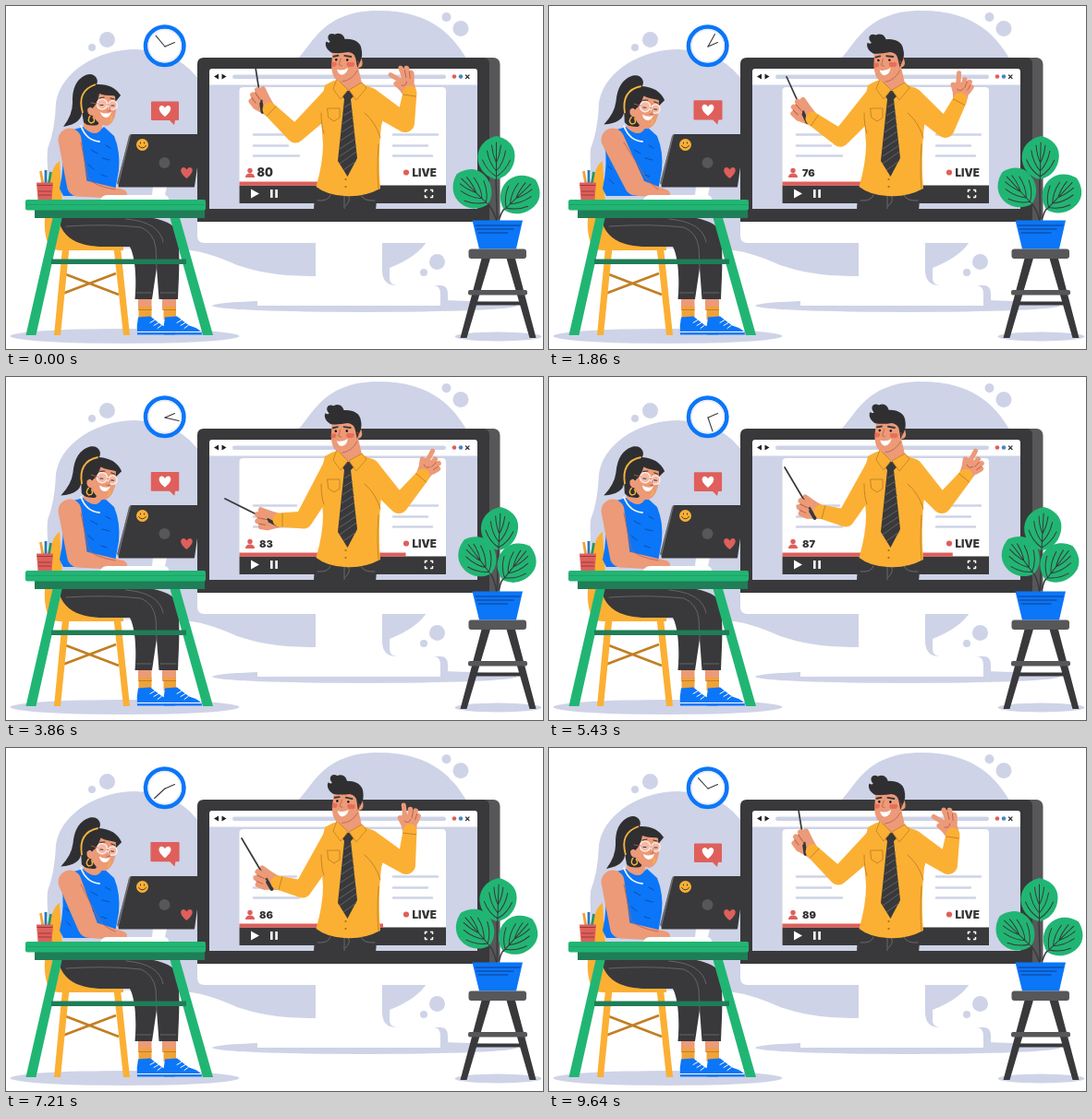
An HTML page that plays this animation: 581 by 372 pixels, repeating every 9.71 s.

```html
<!DOCTYPE html>
<html lang="en">
<head>
<meta charset="utf-8">
<title>Online lesson</title>
<style>
html, body { margin: 0; width: 100%; height: 100%; overflow: hidden; background: #fff; }
svg { display: block; width: 100vw; height: 100vh; }
text { font-family: Inter, sans-serif; font-weight: 900; fill: #333335; }
.pale { fill: #ced3e7; }
.dark { fill: #39393b; }
.grey { fill: #575759; }
.yellow { fill: #fbb034; }
.green { fill: #21b573; }
.deep { fill: #1f7d57; }
.blue { fill: #0b76f8; }
.red { fill: #df5f5b; }
.skin { fill: #ec9a78; }
.white { fill: #fff; }
.line { fill: none; stroke: #39393b; stroke-linecap: round; stroke-linejoin: round; }
.seam { fill: none; stroke: #c17f22; stroke-width: .9; stroke-linecap: round; }
.fold { fill: none; stroke: #b9604b; stroke-width: .8; stroke-linecap: round; }
.finger { fill: none; stroke: #ec9a78; stroke-width: 5; stroke-linecap: round; stroke-linejoin: round; }
</style>
</head>
<body>
<svg viewBox="0 0 581 372">
<defs>
  <path id="heart" d="M0 6C-9-1-6.500-6-3.300-6Q-1-6 0-3.500Q1-6 3.300-6C6.500-6 9-1 0 6Z"/>
  <g id="leaf">
    <path class="green" d="M0 0C-11-2-21-12-20-26C-19-38-9-45 0-47C10-45 20-38 20-26C20-12 11-2 0 0Z"/>
    <path class="line" stroke-width="1" d="M0 0V-40M0-3Q-10-9-15-21M0-3Q10-9 15-21M0-9Q-8-18-10-31M0-9Q8-18 10-31M0-18Q-4-26-5-37M0-18Q4-26 5-37"/>
  </g>
  <g id="shoe">
    <path class="blue" d="M1 0L14-1L27 9Q41 13 41 19H0Q-1 9 1 0Z"/>
    <path class="white" d="M0 15.500H40V16.500H0Z"/>
    <path class="line" style="stroke:#fff" stroke-width="1" d="M14 6l5-3M18 9l5-3M22 12l4-3"/>
  </g>
  <clipPath id="screen"><path d="M200 0H581V220H200Z"/></clipPath>
</defs>

<!-- backdrop -->
<g class="pale">
  <path d="M54 105C59 72 98 47 140 47Q190 49 212 85L462 240Q456 268 415 284Q375 296 335 293C295 293 275 289 250 281Q215 265 190 264L100 262Q40 235 45 155Q53 135 54 105Z"/>
  <path d="M312 60C330 48 338 5 403 5C462 5 485 34 500 60Z"/>
  <circle cx="109.500" cy="36.500" r="8.500"/><circle cx="93" cy="45" r="4"/>
  <circle cx="476.500" cy="12" r="5"/><circle cx="492" cy="24.500" r="8.500"/>
  <circle cx="466.500" cy="277.500" r="8.500"/><circle cx="452" cy="289" r="4"/>
  <ellipse cx="388" cy="325" rx="165" ry="7"/>
  <ellipse cx="128.500" cy="358" rx="124" ry="8"/>
  <ellipse cx="532.500" cy="358.500" rx="47" ry="5"/>
</g>

<!-- clock -->
<circle class="white" cx="171.700" cy="43.200" r="20.700" stroke="#0b76f8" stroke-width="4.600"/>
<circle cx="171.700" cy="43.200" r="17.500" fill="none" stroke="#e9ecf5" stroke-width="1.500"/>
<path class="line" stroke-width="1.100" d="M172 44L182.500 39.500"/>
<path id="minute" class="line" stroke-width="1.100" d="M172 44V28.500"/>

<!-- monitor -->
<path class="pale" d="M405 250H415V296Q416 303 423 303H470Q478 303 478 312V325H440V310H405Z"/>
<path class="white" d="M207 230H535V249Q535 257 527 257H407V288Q408 303 422 303H462Q470 303 470 312V325H272V319Q334 319 335 300V257H215Q207 257 207 249Z"/>
<path class="white" d="M272 303H340V325H272Z"/>
<rect class="grey" x="490" y="56" width="44.500" height="178" rx="7"/>
<path class="dark" d="M214 56H516Q523 56 523 63V234H207V63Q207 56 214 56Z"/>
<path class="pale" d="M220 80H510V220H220Z"/>
<path class="white" d="M220 85.500V71Q220 68 223 68H507Q510 68 510 71V85.500Z"/>
<path fill="#222" d="M230 73.500V79.500L225 76.500ZM233.500 73.500V79.500L238.500 76.500Z"/>
<rect class="pale" x="245" y="74.500" width="231" height="4.500" rx="2.200"/>
<circle class="red" cx="485" cy="76.500" r="2.300"/><circle cx="492" cy="76.500" r="2.300" fill="#4a86c8"/>
<path class="line" stroke-width="1.300" d="M497.500 75l3.500 3.500m0-3.500l-3.500 3.500"/>
<path class="white" d="M252.500 214V92Q252.500 88 257 88H472Q476 88 476 92V214Z"/>
<path fill="none" stroke="#ced3e7" stroke-width="2.400" stroke-linecap="round" d="M268 139.500H314M268 151.500H305M268 162.500H317M419 139.500H467M419 151.500H456M419 162.500H461"/>
<path class="dark" d="M252.500 194.500H476V214H252.500Z"/>
<rect id="progress" class="red" x="252.500" y="190.500" height="4.200"/>
<path class="white" d="M265 198.500L274 203.500L265 208.500ZM286 199h2.600v9h-2.600ZM291.300 199h2.600v9h-2.600Z"/>
<path class="line" style="stroke:#fff;stroke-linecap:butt" stroke-width="1.500" d="M456 199.500H453.500V202M459 199.500H461.500V202M456 207.500H453.500V205M459 207.500H461.500V205"/>
<circle class="red" cx="264" cy="178.500" r="2.700"/><path class="red" d="M259 186Q259 181.500 264 181.500Q269 181.500 269 186Z"/>
<text id="viewers" y="185"></text>
<circle class="red" cx="433" cy="180.500" r="3.100"/>
<text x="439.500" y="184.500" font-size="11.600">LIVE</text>

<!-- teacher -->
<g clip-path="url(#screen)">
  <path class="dark" d="M337 200H402Q401 210 400 222H333Q333 210 337 200Z"/>
  <path class="line" style="stroke:#77777b" stroke-width=".8" d="M337 211Q349 212 351 205M366 205V220M370 205Q374 211 367 217M384 205Q387 212 399 211"/>
  <g id="rightHand">
    <path class="skin" d="M-6 4C-8-4-9-11-6-17L7-17Q10-8 5 4Z"/>
    <g id="fingers">
      <path class="finger" d="M2-13L3-20M5-11L8-18M7-8L10-13"/>
      <path class="fold" d="M3.500-12L5.500-18M6.500-10L9-15"/>
    </g>
    <path class="finger" d="M-5-6L-8-14"/>
    <g id="index"><path class="finger" style="stroke-width:4.600" d="M0 0L0-11"/></g>
    <path class="fold" d="M-4-10Q0-7 2-11"/>
  </g>
  <g id="leftHand">
    <path class="skin" d="M-14-5L-4-8Q8-10 9 0Q8 9-2 9L-14 6Z"/>
    <path class="finger" d="M-2-6L6-9"/>
  </g>
  <path id="stick" class="line" stroke-width="1.700"/>
  <path id="handle" class="line" stroke-width="3.800"/>
  <g id="grip">
    <path class="finger" d="M2-3L9-5M2 2L9 1M0 7L6 6"/>
    <path class="fold" d="M2-.500L9-2M2 4.500L8 3.500"/>
  </g>
  <path id="sleeves" class="yellow"/>
  <path class="yellow" d="M345 86Q356 79 361 80L386 85Q402 89 408 109Q410 118 406 130Q402 165 405 198Q386 208 366 206Q347 205 335.500 196Q343 170 343 150L340 108Z"/>
  <path id="cuffs" class="seam"/>
  <path class="seam" d="M388 116Q400 126 405 143M341 116Q341 130 344 138M403 150Q401 180 403 198M348 111H361V121L355 125L349 121Z"/>
  <path class="skin" d="M360 70L380 62L385 84L371 92L360 82Z"/>
  <path class="dark" d="M366 92L375 92L376 98L373 101L380 165L369.500 185L359 168L366 101L364 98Z"/>
  <path fill="none" stroke="#68686c" stroke-width=".9" d="M366 110l8-5M365 119l10-6M364 128l12-8M363 137l14-9M362 146l15-10M361 155l17-11M361 163l18-12M361 171l18-13M365 178l14-10"/>
  <path class="yellow" stroke="#c17f22" stroke-width=".8" d="M358 79L370 91L362 101L354 90ZM385 83L371 91L379 102L390 89Z"/>
  <circle cx="367.500" cy="188" r="1.100" fill="#a96b18"/><circle cx="367.500" cy="196" r="1.100" fill="#a96b18"/>
  <g id="teacherHead">
    <path class="skin" d="M353 48L352 64C352 75 356 82 363 82C371 82 378 76 381 67Q387 66 385 59L381 45Z"/>
    <path fill="#e5604f" opacity=".75" d="M351.800 61h5q2 3-1 5h-4ZM369 61h7q2 3-1 5h-5q-3-2-1-5Z"/>
    <path fill="#2f2f31" d="M352 51C346 48 344 42 346 39Q349 41 350 39C345 34 349 28 355 31C361 28 365 32 366 36C375 35 383 39 384 46Q386 54 383 60L380 67L378 57Q377 51 370 50Q360 52 352 51Z"/>
    <path class="line" stroke-width="1.900" d="M354 55l5-1M366 54l7 1"/>
    <circle cx="357" cy="58.500" r="1.200"/><circle cx="369" cy="58.500" r="1.200"/>
    <path class="fold" d="M362 57L360 64L363 65M380 60q3 1 1 4M364 82Q374 81 380 70"/>
    <path class="white" d="M358 69Q364 71 370 67Q369 74 363 75Q359 74 358 69Z"/>
  </g>
</g>

<!-- chair -->
<path class="yellow" d="M58 168C46 176 49 196 44 214Q39 240 45 257Q48 266 60 265H127V250L62 232Z"/>
<path fill="none" stroke="#c17f22" stroke-width="2.800" d="M62 290L122 313M61 312L119 290"/>
<path class="yellow" d="M61 262h7.500L59 357H52ZM116.500 262h7.500L134 357H127Z"/>

<!-- legs -->
<path class="dark" d="M56 226C58 250 76 262 110 261L134 261C141 275 141 300 139.500 318H158L163 284L165.500 318H186C187 290 190 252 182 240Q172 229 130 226Z"/>
<path class="line" style="stroke:#707074" stroke-width=".8" d="M65 239Q110 236 146 240Q160 246 162 262L163 285M141 311H157M167 311H184M130 231Q166 234 170 256"/>
<path class="skin" d="M143 318h14.500v12h-14.500ZM169 318h15v12h-15Z"/>
<path fill="#f0a23a" d="M143.500 326h14v14h-14ZM170.500 326h13.500v14h-13.500Z"/>
<path fill="none" stroke="#c17f22" d="M143.500 329.500h14M170.500 329.500h13.500"/>
<use href="#shoe" x="171" y="337.500"/><use href="#shoe" x="142" y="337.500"/>

<!-- student -->
<path class="blue" d="M73 134L84 131Q96 141 106 131L117 141Q124 158 122 178L117 206H62L58 198Q64 170 60 150Z"/>
<path class="line" style="stroke:#0a4fae" stroke-width="1" d="M92 156l7 4M104 165l8 2M89 172l6 5M108 151l5 3M103 183l6 2M65 188l5 5M64 174l4 3M98 193l5 3"/>
<path class="skin" d="M84 116L104 122V132Q98 144 84 132Z"/>
<path class="line" style="stroke:#f3f3f3" stroke-width="1.800" d="M81 130Q87 146 101 147"/>
<path id="arm" class="skin"/>
<path id="armFold" class="fold"/>
<g id="studentHead">
  <path fill="#2f2f31" d="M86 75C96 71 101 80 98 85Q116 84 124 97L112 112L99 129Q88 131 84 126L82 114Q83 127 62 131Q72 118 72 105Q71 82 86 75Z"/>
  <path class="skin" d="M97 96Q108 91 118 98L119 114Q117 128 109 130Q99 129 94 119Q88 119 88 112Q91 108 94 111Z"/>
  <path fill="#2f2f31" d="M90 91Q108 83 124 97Q108 98 101 95Q99 107 93 111Q87 104 90 91Z"/>
  <path fill="none" stroke="#f4b441" stroke-width="1.800" d="M83 116Q76 92 97 85"/>
  <circle cx="104" cy="106.500" r="5.600" fill="#f5b8a4" stroke="#fff0e9" stroke-width="1.300"/>
  <circle cx="115.500" cy="107.500" r="4.800" fill="#f5b8a4" stroke="#fff0e9" stroke-width="1.300"/>
  <path class="fold" d="M109.500 107h1.500M92 105l7 1M112 109l1 5h-3"/>
  <path class="line" stroke-width="1.100" d="M101 100l5-1M113 100l4 1M102 107.500h3M114 108h3"/>
  <path class="white" d="M102 115Q108 118 114 115Q112 121 108 121Q103 120 102 115Z"/>
  <path fill="none" stroke="#f4b441" stroke-width="1.500" d="M91 119q-4 6 1 8q6-1 2-7M113 119q3 4-1 6"/>
</g>

<!-- desk -->
<path class="green" d="M51 228h10L32.500 357H21.500ZM177 228h10.500L224 357H213Z"/>
<path class="deep" d="M49 274.500H195V280H49ZM31 219H215V230H31Z"/>
<rect class="green" x="21" y="210" width="195" height="11.500" rx="2"/>
<path class="deep" d="M22 215H215V216H22Z" opacity=".35"/>
<path class="white" d="M102 210Q104 205 110 205H158L159 196H174L172 205Q176 206 176 210Z"/>
<path fill="#77777b" d="M134 139L120 192L123 196L140 141Z"/>
<path class="dark" stroke="#39393b" stroke-width="2" stroke-linejoin="round" d="M136 140H211L203 195.500H122.500Z"/>
<path class="line" style="stroke:#606064" stroke-width=".9" d="M133.500 141L121 192"/>
<circle class="grey" cx="171.500" cy="170" r="6"/>
<circle class="yellow" cx="147.500" cy="150.500" r="6.500"/>
<path class="line" stroke-width="1" d="M145.500 148v1M149.500 148v1M143.500 151.500q4 5 8 0"/>
<use class="red" href="#heart" x="195.500" y="181"/>
<path fill="none" stroke-width="2.800" stroke="#f0a23a" d="M40 194L37.500 179"/>
<path fill="none" stroke-width="2.800" stroke="#2878b8" d="M43 194V178"/>
<path fill="none" stroke-width="2.800" stroke="#2a946b" d="M46 194L48.500 180"/>
<path class="red" d="M33 191.500H51L49.500 210H34.500Z"/>
<path fill="none" stroke="#963c3b" stroke-width="1" d="M33.500 194.500H50.500M35 201H49M35 205H49"/>

<g id="bubble">
  <path class="red" d="M158 103.500H186Q187 103.500 187 104.500V123Q187 124 186 124H183L182 129L177 124H158Q157 124 157 123V104.500Q157 103.500 158 103.500Z"/>
  <use class="white" href="#heart" x="172" y="114"/>
</g>

<!-- plant -->
<g id="stemTop"><path class="line" stroke-width="1.500" d="M530 186L531.500 234"/><use href="#leaf" x="530.500" y="188"/></g>
<g id="stemLeft"><path class="line" stroke-width="1.500" d="M521 214Q528 222 531 234"/><use href="#leaf" transform="translate(521.500 215) rotate(-46)"/></g>
<g id="stemRight"><path class="line" stroke-width="1.500" d="M539 220Q535 225 533 234"/><use href="#leaf" transform="translate(539 221) rotate(46)"/></g>
<path class="dark" d="M515 272h9.500L498.500 360H491.500ZM541 272h9.500L573.500 360H566.500ZM502 320.500H563V324.500H502Z"/>
<rect class="grey" x="500" y="308" width="64" height="5.500" rx="2"/>
<path class="blue" d="M504.500 232.500H559L552 263.500H512Z"/>
<path class="line" style="stroke:#123d85" stroke-width="1" d="M508 238H556M509 242H549M511 246H543"/>
<rect class="grey" x="500.500" y="263.500" width="62.500" height="10.500" rx="3"/>
</svg>

<script>
const LOOP = 9710;
const TIMES = [0, 1070, 2570, 3860, 5430, 7210, LOOP];
const VIEWERS = [80, 76, 83, 87, 86, 89];

const REST = [313, 139, 285, 112, 270, 67];
const ASIDE = [321, 153, 294, 146, 255, 98];
// elbow, wrist, stick tip
const POINTING = [REST, REST, [317, 147, 285, 131, 246, 85], [322, 155, 296, 155, 237, 132], ASIDE, ASIDE, REST];

const PINCH = [432, 127, 437, 94, -27, -32, 1];
const OPEN = [425, 138, 451, 107, 28, 0, 0];
// elbow, wrist, hand angle, index angle, finger spread
const GESTURE = [PINCH, [433, 127, 439, 95, -18, -2, 0], [425, 138, 450, 107, 23, 0, 0], OPEN, OPEN, [433, 127, 437, 90, -7, 0, .2], PINCH];
const NOD = [0, 7, 7, 7, 7, 7, 0].map(angle => [angle]);

const $ = id => document.getElementById(id);
const set = (id, name, value) => $(id).setAttribute(name, value);
const move = (id, value) => set(id, 'transform', value);
const wave = (t, cycles) => (1 - Math.cos(2 * Math.PI * cycles * t / LOOP)) / 2;

function pose(keys, t) {
  let i = 0;
  while (t >= TIMES[i + 1]) i++;
  const u = (t - TIMES[i]) / (TIMES[i + 1] - TIMES[i]);
  const eased = u * u * (3 - 2 * u);
  return keys[i].map((from, k) => from + (keys[i + 1][k] - from) * eased);
}

// Tapered capsule between two circles
function limb(x1, y1, r1, x2, y2, r2) {
  const len = Math.hypot(x2 - x1, y2 - y1);
  const nx = (y2 - y1) / len, ny = (x1 - x2) / len;
  return `M${x1 + nx * r1} ${y1 + ny * r1}L${x2 + nx * r2} ${y2 + ny * r2}` +
    `A${r2} ${r2} 0 0 1 ${x2 - nx * r2} ${y2 - ny * r2}` +
    `L${x1 - nx * r1} ${y1 - ny * r1}A${r1} ${r1} 0 0 1 ${x1 + nx * r1} ${y1 + ny * r1}Z`;
}

function cuff(ex, ey, wx, wy) {
  const len = Math.hypot(wx - ex, wy - ey);
  const dx = (wx - ex) / len, dy = (wy - ey) / len;
  const x = wx - dx * 3, y = wy - dy * 3;
  return `M${x - dy * 7} ${y + dx * 7}L${x + dy * 7} ${y - dx * 7}`;
}

function drawTeacher(t) {
  const [ex, ey, wx, wy, tx, ty] = pose(POINTING, t);
  const angle = Math.atan2(wy - ey, wx - ex);
  const hx = wx + Math.cos(angle) * 13, hy = wy + Math.sin(angle) * 13;
  const reach = Math.hypot(hx - tx, hy - ty);
  const ux = (hx - tx) / reach, uy = (hy - ty) / reach;
  const hand = `translate(${hx} ${hy}) rotate(${angle * 180 / Math.PI}) scale(1.2 -1.2)`;
  move('leftHand', hand);
  move('grip', hand);
  set('stick', 'd', `M${tx} ${ty}L${hx} ${hy}`);
  set('handle', 'd', `M${hx - ux * 6} ${hy - uy * 6}L${hx + ux * 12} ${hy + uy * 12}`);

  const [fx, fy, vx, vy, turn, bend, spread] = pose(GESTURE, t);
  move('rightHand', `translate(${vx} ${vy}) rotate(${turn}) scale(1.1)`);
  move('index', `translate(-3 -15) rotate(${bend})`);
  move('fingers', `scale(1 ${1 + spread * .25})`);

  set('sleeves', 'd', limb(355, 99, 13, ex, ey, 9.5) + limb(ex, ey, 9.5, wx, wy, 7.5) +
    limb(392, 101, 13, fx, fy, 10) + limb(fx, fy, 10, vx, vy, 7.5));
  set('cuffs', 'd', cuff(ex, ey, wx, wy) + cuff(fx, fy, vx, vy));
  const tilt = 1 + 3 * Math.cos(2 * Math.PI * (t - 7210) / LOOP);
  move('teacherHead', `rotate(${tilt} 372 78)`);
}

function drawStudent(t) {
  const part = t < 4000 ? t / 4000 : t < 6000 ? 0 : (t - 6000) / (LOOP - 6000);
  const swing = Math.sin(Math.PI * part) ** 2;
  const ex = 77 + swing * 16, ey = 195 - swing;
  set('arm', 'd', limb(69, 145, 12.5, ex, ey, 11) + limb(ex, ey + 2, 9.5, 126, 204, 5));
  set('armFold', 'd', `M81 148L${ex + 12} ${ey - 8}Q${ex + 18} ${ey} 118 199`);
  move('studentHead', `rotate(${pose(NOD, t)[0]} 82 108)`);
}

function draw(t) {
  const sway = wave(t, 1), pulse = wave(t, 2);
  move('minute', `rotate(${320 + 360 * t / LOOP} 172 44)`);
  set('progress', 'width', 121.5 + 65 * sway);
  const count = VIEWERS[Math.floor(t / LOOP * VIEWERS.length)];
  const first = count === VIEWERS[0];
  $('viewers').textContent = count;
  set('viewers', 'x', first ? 271.5 : 274);
  set('viewers', 'font-size', first ? 12.5 : 11);
  move('bubble', `translate(172 ${116 - pulse}) scale(${1 + pulse * .04}) translate(-172 -116)`);
  move('stemTop', `rotate(${3.3 * sway} 531 232)`);
  move('stemLeft', `rotate(${10 * sway} 531 232)`);
  move('stemRight', `rotate(${-8 * sway} 531 232)`);
  drawTeacher(t);
  drawStudent(t);
}

function tick() {
  draw(performance.now() % LOOP);
  requestAnimationFrame(tick);
}
tick();
</script>
</body>
</html>
```
